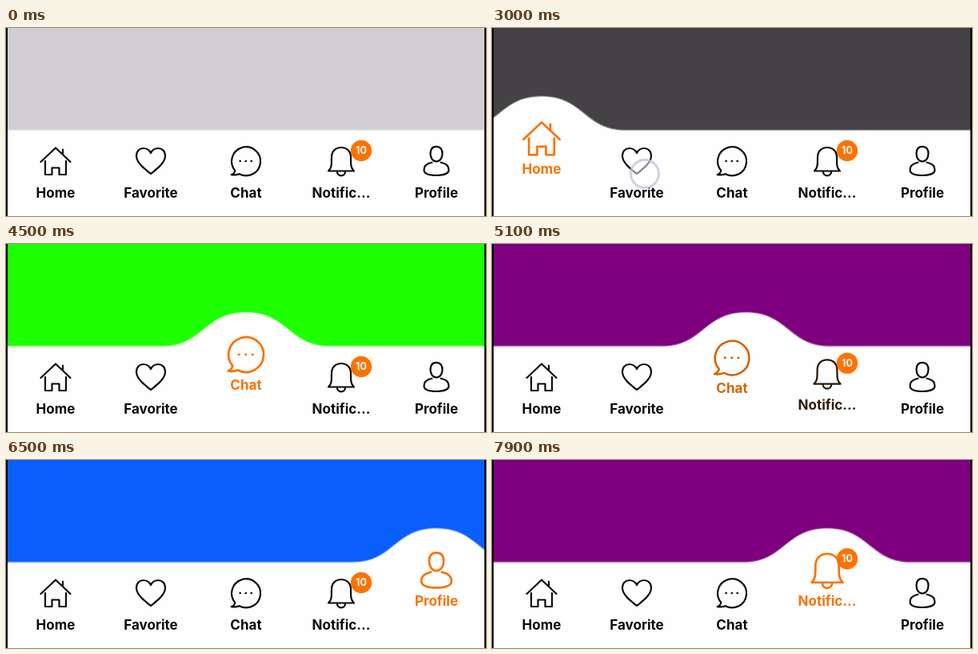
Recreate the animation shown at these times as an HTML page. Size 600x236 px, loop 8000 ms.

```html
<!DOCTYPE html>
<html lang="en">
<head>
<meta charset="utf-8">
<title>Curved tab bar</title>
<style>
  html, body { margin: 0; width: 100%; height: 100%; overflow: hidden; background: #000; }
  svg { display: block; width: 600px; height: 236px; }
  text { font-family: Inter, sans-serif; font-weight: 700; text-anchor: middle; }
  .label { font-size: 17px; }
  .count { font-size: 12.5px; fill: #fff; }
  .icon { fill: none; stroke-width: 2.2; stroke-linecap: round; stroke-linejoin: round; }
</style>
</head>
<body>
<svg id="stage" viewBox="0 0 600 236">
  <rect id="page" x="2" width="596" height="236"/>
  <path id="bar" fill="#fdfefd" stroke="#fff" stroke-opacity=".4" stroke-width="2.4"/>
  <g id="tabs"></g>
  <circle id="touch" r="17.5" fill="#fff" fill-opacity=".5" stroke="#bfc3dc" stroke-opacity=".75" stroke-width="3"/>
  <path d="M0 0H2V236H0ZM598 0H600V236H598Z"/>
</svg>
<script>
const LOOP = 8000, TICK = 100, SLIDE = 400;
const INK = [10, 10, 10], ORANGE = [250, 114, 2];
const LIGHT = 'rgb(209,207,209)';
const BASE = 128.8, PEAK = 86.3;

// label, page colour, icon
const TABS = [
  ['Home', 'rgb(153,151,153)', 'M-18.5 1L0-16.5L18.5 1M9-14.5V-8M-13 0V17H-4.5V8.5H4.5V17H13V0'],
  ['Favorite', 'rgb(68,66,68)', 'M0 16C-6 11-18 3-18-6.5C-18-12.5-14-16-9.5-16C-5-16-1.5-13.5 0-10C1.5-13.5 5-16 9.5-16C14-16 18-12.5 18-6.5C18 3 6 11 0 16Z'],
  ['Chat', 'rgb(30,255,0)', 'M-8.4 16.2Q-12.4 18-18.4 17.2Q-14.4 15.7-13.7 11.9A18 18 0 1 1-8.4 16.2ZM-7.6 .2h.6M-.5 .2h.6M6.4 .2h.6'],
  ['Notific...', 'rgb(126,0,126)', 'M-16 12.5C-12 9-12 5-12-4.5C-12-12.5-7-17 0-17C7-17 12-12.5 12-4.5C12 5 12 9 16 12.5ZM-5 13.5A5 4.8 0 0 0 5 13.5'],
  ['Profile', 'rgb(10,95,251)', 'M0-18.2C5-18.2 7.5-15 7.5-9.5C7.5-4 4.5.5 0 .5C-4.5.5-7.5-4-7.5-9.5C-7.5-15-5-18.2 0-18.2ZM-5.5 1.8C-11 3-15.5 6-15.5 11C-15.5 16-8 18 0 18S15.5 16 15.5 11C15.5 6 11 3 5.5 1.8']
];

// touch down, release, from tab, to tab, touch point
const MOVES = [
  [400, 400, -1, 0, 66, 197],
  [3000, 3000, 0, 1, 191, 183],
  [4000, 4100, 1, 2, 305, 190],
  [5000, 5000, 2, 3, 425, 190],
  [6000, 6100, 3, 4, 535, 196],
  [7500, 7500, 4, 3, 424, 198]
];

const $ = id => document.getElementById(id);
const tabX = i => 62 + 119 * i;
const mix = (a, b, k) => a + (b - a) * k;
const blend = (a, b, k) => `rgb(${a.map((v, i) => Math.round(mix(v, b[i], k)))})`;
const ease = p => (1 - Math.cos(Math.PI * p)) / 2;
const set = (el, attrs) => { for (const k in attrs) el.setAttribute(k, attrs[k]); };

function add(parent, tag, attrs, text = '') {
  const el = document.createElementNS('http://www.w3.org/2000/svg', tag);
  set(el, attrs);
  el.textContent = text;
  return parent.appendChild(el);
}

const parts = TABS.map(([name, , d], i) => {
  const g = add($('tabs'), 'g', {});
  const icon = add(g, 'path', { class: 'icon', d });
  const label = add(g, 'text', { class: 'label', x: tabX(i) }, name);
  const badge = name === 'Notific...' && add(g, 'g', {});
  if (badge) {
    add(badge, 'circle', { cx: 444, cy: 154, r: 13.2, fill: '#fe7200' });
    add(badge, 'text', { class: 'count', x: 444, y: 158.4 }, '10');
  }
  return { icon, label, badge };
});

function barPath(x, rise) {
  const top = mix(BASE, PEAK, rise);
  return `M-200 ${BASE}H${x - 105}C${x - 53} ${BASE} ${x - 53} ${top} ${x} ${top}` +
    `S${x + 53} ${BASE} ${x + 105} ${BASE}H800V260H-200Z`;
}

function draw(ms) {
  const t = Math.floor(ms / TICK) * TICK;
  const [down, up, from, to, tx, ty] = MOVES.filter(m => m[0] <= t).pop() || MOVES[0];
  const p = ease(Math.min(1, Math.max(0, (t - up) / SLIDE)));
  const first = from < 0;

  // the page switches at once on release, the bar follows
  const shown = t >= up ? to : from;
  set($('page'), { fill: shown < 0 ? LIGHT : TABS[shown][1] });
  const x = first ? tabX(to) : mix(tabX(from), tabX(to), p);
  set($('bar'), { d: barPath(x, first ? p : 1) });

  parts.forEach(({ icon, label, badge }, i) => {
    const k = i === to ? p : i === from ? 1 - p : 0;
    const color = blend(INK, ORANGE, k);
    set(icon, {
      stroke: color,
      transform: `translate(${tabX(i)} ${167 - 28.5 * k}) scale(${1 + 0.22 * k})`
    });
    set(label, { fill: color, y: 212.5 - 30 * k });
    if (badge) set(badge, { transform: `translate(0 ${-30 * k})` });
  });

  const touching = t >= down && t < up + TICK;
  set($('touch'), { cx: tx, cy: ty, opacity: touching ? 1 : 0 });
}

const begin = performance.now();
function loop() {
  draw((performance.now() - begin) % LOOP);
  requestAnimationFrame(loop);
}
loop();
</script>
</body>
</html>
```
